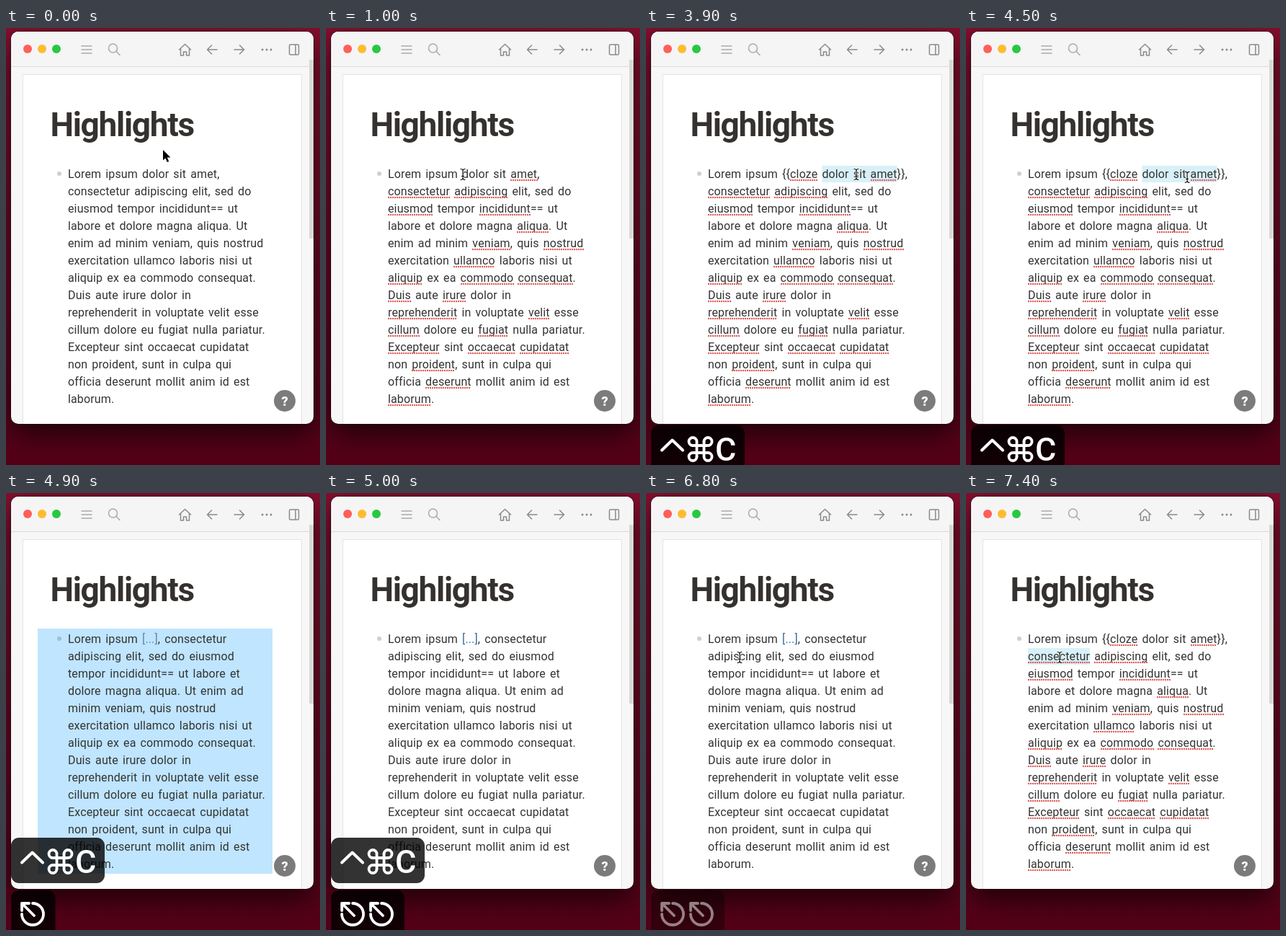
An HTML page with a canvas that plays this animation: 436 by 606 pixels, repeating every 8 s.

```html
<!DOCTYPE html>
<html lang="en">
<head>
<meta charset="utf-8">
<title>Highlights</title>
<style>
  html, body { margin: 0; width: 100%; height: 100%; overflow: hidden; background: #500016; }
  canvas { display: block; }
</style>
</head>
<body>
<canvas id="stage" width="436" height="606"></canvas>
<script>
const ctx = document.getElementById('stage').getContext('2d');
const LOOP = 8000;
const SANS = 'Roboto, "Open Sans", sans-serif';
const LEFT = 86, BASELINE = 208, LEADING = 24;

const tail = [
  'exercitation ullamco laboris nisi ut', 'aliquip ex ea commodo consequat.',
  'Duis aute irure dolor in', 'reprehenderit in voluptate velit esse',
  'cillum dolore eu fugiat nulla pariatur.', 'Excepteur sint occaecat cupidatat',
  'non proident, sunt in culpa qui', 'officia deserunt mollit anim id est', 'laborum.'];
const body = [
  'consectetur adipiscing elit, sed do', 'eiusmod tempor incididunt== ut',
  'labore et dolore magna aliqua. Ut', 'enim ad minim veniam, quis nostrud', ...tail];
const plain = ['Lorem ipsum dolor sit amet,', ...body];
const cloze = ['Lorem ipsum {{cloze dolor sit amet}},', ...body];
const hidden = [
  'Lorem ipsum [...], consectetur', 'adipiscing elit, sed do eiusmod',
  'tempor incididunt== ut labore et', 'dolore magna aliqua. Ut enim ad',
  'minim veniam, quis nostrud', ...tail];
const misspelled = new RegExp('\\b(amet|cloze|consectetur|adipiscing|eiusmod|incididunt|aliqua|veniam|' +
  'nostrud|ullamco|aliquip|commodo|consequat|Duis|irure|reprehenderit|velit|cillum|fugiat|' +
  'Excepteur|occaecat|cupidatat|proident|deserunt|laborum)\\b', 'g');

// time, x, y
const pointerPath = [
  [100, 218, 169], [600, 190, 203], [1000, 190, 203], [1900, 292, 203], [3900, 292, 203],
  [4600, 308, 207], [5700, 308, 207], [5850, 324, 207], [6200, 174, 220], [6600, 130, 228]];

const clamp = v => Math.max(0, Math.min(1, v));
const smooth = v => v * v * (3 - 2 * v);
const progress = (t, from, to) => clamp((t - from) / (to - from));

function pointerAt(t) {
  let [, x, y] = pointerPath[0];
  for (let i = 1; i < pointerPath.length; i++) {
    const [t0, x0, y0] = pointerPath[i - 1], [t1, x1, y1] = pointerPath[i];
    if (t < t0) break;
    const k = smooth(progress(t, t0, t1));
    x = x0 + (x1 - x0) * k;
    y = y0 + (y1 - y0) * k;
  }
  return [x, y];
}

function box(x, y, w, h, r, fill) {
  ctx.beginPath();
  ctx.roundRect(x, y, w, h, r);
  ctx.fillStyle = fill;
  ctx.fill();
}

function disc(x, y, r, fill) {
  ctx.beginPath();
  ctx.arc(x, y, r, 0, 7);
  ctx.fillStyle = fill;
  ctx.fill();
}

function stroke(path, color, width) {
  ctx.strokeStyle = color;
  ctx.lineWidth = width;
  ctx.lineCap = ctx.lineJoin = 'round';
  ctx.stroke(new Path2D(path));
}

function type(text, x, y, font, fill, letter = 0) {
  ctx.font = font + ' ' + SANS;
  ctx.letterSpacing = letter + 'px';
  ctx.wordSpacing = '0px';
  ctx.fillStyle = fill;
  ctx.fillText(text, x, y);
}

function useBodyFont() {
  ctx.font = '16px ' + SANS;
  ctx.letterSpacing = '0.13px';
  ctx.wordSpacing = '2px';
}

const xOf = (line, index) => LEFT + ctx.measureText(line.slice(0, index)).width;

function drawDesktop() {
  const sky = ctx.createLinearGradient(0, 0, 0, 606);
  sky.addColorStop(0, '#85102f');
  sky.addColorStop(1, '#540017');
  ctx.fillStyle = sky;
  ctx.fillRect(0, 0, 436, 606);
  ctx.save();
  ctx.shadowColor = 'rgba(0,0,0,.7)';
  ctx.shadowBlur = 42;
  ctx.shadowOffsetY = 14;
  box(6.5, 4.5, 421, 545, 10.5, '#14040a');
  ctx.restore();
}

function drawWindow() {
  box(7, 5, 420, 544, 10, '#f7f7f7');
  ctx.save();
  ctx.clip();
  ctx.fillStyle = '#f5f5f5';
  ctx.fillRect(7, 5, 420, 48);
  ctx.fillStyle = '#dcdcdc';
  ctx.fillRect(7, 53, 420, 1);
  ctx.fillStyle = '#e4e4e4';
  ctx.fillRect(23, 64, 388, 500);
  ctx.fillStyle = '#fff';
  ctx.fillRect(24, 65, 386, 500);
  ctx.fillStyle = '#d9d9d9';
  ctx.fillRect(421, 44, 6, 248);
  ctx.restore();

  ['#ff5f57', '#febc2e', '#28c840'].forEach((c, i) => disc(30 + 20 * i, 29, 6, c));
  stroke('M105 25h14M105 30h14M105 35h14', '#aaa', 1.5);
  stroke('M154.5 28a6 6 0 1 1-12 0a6 6 0 1 1 12 0M153 32.5l5 5', '#aaa', 1.5);
  stroke('M240.5 30l8-7.5l8 7.5M242.5 28.5v9.5h4v-5h4v5h4v-9.5', '#8a8a8a', 1.5);
  stroke('M293 30h-13.5M285.5 24l-6 6l6 6M317 30h13.5M324.5 24l6 6l-6 6', '#8a8a8a', 1.5);
  [356, 362, 368].forEach(x => disc(x, 30, 1.5, '#8a8a8a'));
  stroke('M395 23h10a1.5 1.5 0 0 1 1.5 1.5v11a1.5 1.5 0 0 1-1.5 1.5h-10a1.5 1.5 0 0 1-1.5-1.5v-11a1.5 1.5 0 0 1 1.5-1.5M402 23v14', '#8a8a8a', 1.5);
  type('Highlights', 61.5, 150, 'bold 46px', '#35312f', -1.3);
}

function drawText(lines, editing, selection, blockSelected) {
  if (blockSelected) {
    ctx.fillStyle = '#bfe5ff';
    ctx.fillRect(44, 188, 326, 340);
  }
  disc(74, 202, 3, blockSelected ? '#9fbfd4' : '#cfcfcf');
  useBodyFont();
  if (selection) {
    const [row, from, to] = selection;
    const x = xOf(lines[row], from);
    ctx.fillStyle = '#d8f1f8';
    ctx.fillRect(x, 191 + LEADING * row, xOf(lines[row], to) - x, 23);
  }
  lines.forEach((line, row) => {
    const y = BASELINE + LEADING * row;
    ctx.fillStyle = '#333';
    const gap = line.indexOf('[...]');
    if (gap < 0) {
      ctx.fillText(line, LEFT, y);
    } else {
      ctx.fillText(line.slice(0, gap), LEFT, y);
      ctx.fillText(line.slice(gap + 5), xOf(line, gap + 5), y);
      ctx.fillStyle = blockSelected ? '#6585a0' : '#3b6a9c';
      ctx.fillText('[...]', xOf(line, gap), y);
    }
    if (!editing) return;
    ctx.setLineDash([0, 3]);
    for (const m of line.matchAll(misspelled)) {
      const x = Math.round(xOf(line, m.index)) + 1, end = xOf(line, m.index + m[0].length);
      stroke(`M${x} ${y + 3}H${end}`, '#e0605e', 2.4);
    }
    ctx.setLineDash([]);
  });
}

function drawHelp() {
  disc(387, 517, 15, '#7b7b7b');
  ctx.textAlign = 'center';
  type('?', 387, 523.5, '900 18px', '#fff');
  ctx.textAlign = 'left';
}

function drawShortcut(y, alpha) {
  ctx.save();
  ctx.globalAlpha = alpha;
  ctx.translate(7, y);
  box(0, 0, 130, 63, 11, 'rgba(0,0,0,.8)');
  stroke('M15 34.5l14.5-14l14.5 14', '#fff', 4);
  type('C', 89, 49, '500 45px', '#fff');
  ctx.translate(68.5, 33);
  for (let i = 0; i < 4; i++) {
    stroke('M5 -10.5V10.5A5.5 5.5 0 1 0 10.5 5', '#fff', 3.8);
    ctx.rotate(Math.PI / 2);
  }
  ctx.restore();
}

function drawEscape(count, y, alpha) {
  ctx.save();
  ctx.globalAlpha = alpha;
  ctx.translate(7, y);
  box(0, 0, 21 + 40.5 * count, 63, 11, 'rgba(0,0,0,.8)');
  for (let i = 0; i < count; i++) {
    stroke('M30 18A15 15 0 1 1 15 33M32 35L15 18M15 28V18H25', '#fff', 3.8);
    ctx.translate(40, 0);
  }
  ctx.restore();
}

function drawPointer(x, y) {
  ctx.save();
  ctx.translate(x, y);
  if (y < 190) {
    const arrow = 'M0 0V14.5L3.4 11.4L5.8 17L8.2 16L5.8 10.5H10.5Z';
    stroke(arrow, '#fff', 2);
    ctx.fillStyle = '#000';
    ctx.fill(new Path2D(arrow));
  } else {
    const beam = 'M-3 -7.5Q0 -7.5 0 -5Q0 -7.5 3 -7.5M0 -5V5M-3 7.5Q0 7.5 0 5Q0 7.5 3 7.5M-1.5 2.5H1.5';
    stroke(beam, 'rgba(255,255,255,.8)', 2.8);
    stroke(beam, '#111', 1.2);
  }
  ctx.restore();
}

function selectionAt(t, x) {
  if (t >= 7100) return [1, 0, 11];
  if (t >= 3900 && t < 4700) return [0, 20, 34];
  if (t < 1000 || t >= 3900) return null;
  useBodyFont();
  let end = 12;
  while (end < 26 && xOf(plain[0], end + 1) < x + 4) end++;
  return [0, 12, t >= 1900 ? 26 : end];
}

function draw(t) {
  const [x, y] = pointerAt(t);
  const lines = t < 3900 ? plain : t >= 4700 && t < 6900 ? hidden : cloze;
  const editing = t >= 800 && t < 4700 || t >= 6900;
  drawDesktop();
  drawWindow();
  drawText(lines, editing, selectionAt(t, x), t >= 4700 && t < 5000);
  drawHelp();

  const slide = progress(t, 4600, 4700);
  if (t >= 3900 && t < 6100) drawShortcut(551 - 73 * slide, 1 - progress(t, 5700, 6100));
  if (t >= 4600 && t < 7000) drawEscape(t < 5000 ? 1 : 2, 551, slide * (1 - progress(t, 6600, 7000)));
  if (t < 4700 || t >= 5500) drawPointer(x, y);
}

const start = performance.now();
function tick() {
  draw((performance.now() - start) % LOOP);
  requestAnimationFrame(tick);
}
tick();
</script>
</body>
</html>
```
